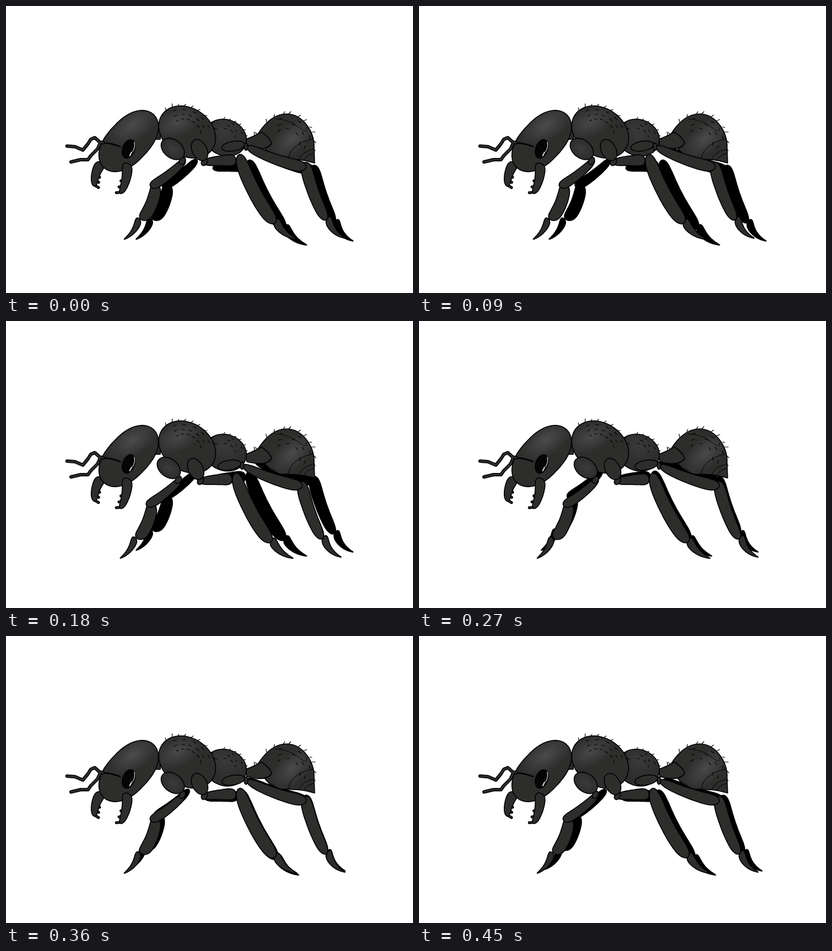
An HTML page for the animation above (0.54 s loop, 720 px wide and 508 px high).

```html
<!DOCTYPE html>
<html lang="en">
<head>
<meta charset="utf-8">
<title>Walking ant</title>
<style>
  html, body { margin: 0; width: 100%; height: 100%; overflow: hidden; background: #fff; }
  svg { display: block; width: 720px; height: 508px; }
  .part { fill: #2d2d2c; stroke: #000; stroke-width: 1.6; stroke-linejoin: round; }
  .far .part { fill: #000; }
  .line { fill: none; stroke: #000; stroke-linecap: round; stroke-linejoin: round; }
</style>
</head>
<body>
<svg viewBox="0 0 720 508">
  <defs></defs>
  <g id="far" class="far"></g>
  <g id="body"></g>
  <g id="near"></g>
</svg>
<script>
const STEP = 90, SHELL = '#2d2d2c';
const defs = document.querySelector('defs');
const far = document.getElementById('far');
const body = document.getElementById('body');
const near = document.getElementById('near');

const make = (tag, parent, attrs) => {
  const el = document.createElementNS('http://www.w3.org/2000/svg', tag);
  for (const k in attrs) el.setAttribute(k, attrs[k]);
  return parent.appendChild(el);
};
const part = (parent, d, fill = '') => {
  make('path', parent, { class: 'part', d }).style.fill = fill;
};
const line = (parent, d, width = 1.2, stroke = '#000') => {
  make('path', parent, { class: 'line', d, 'stroke-width': width }).style.stroke = stroke;
};
const rod = (parent, d, width) => {
  line(parent, d, width);
  line(parent, d, width - 2.8, SHELL);
};
const mix = (a, b, t) => a + (b - a) * t;

let seed = 7;
const random = () => (seed = seed * 16807 % 2147483647) / 2147483647;

// Point on a bowed spine at t, moved sideways by `side`.
function along([x1, y1], [x2, y2], bend, t, side = 0) {
  const len = Math.hypot(x2 - x1, y2 - y1);
  const off = bend * 4 * t * (1 - t) + side;
  return [mix(x1, x2, t) - (y2 - y1) / len * off, mix(y1, y2, t) + (x2 - x1) / len * off];
}

// Tapered, bowed tube with rounded ends; power 2 makes an ellipse.
function tube(a, b, w1, w2, bend = 0, power = 6) {
  const n = 24, left = [], right = [];
  for (let i = 0; i <= n; i++) {
    const t = (1 - Math.cos(Math.PI * i / n)) / 2;
    const w = mix(w1, w2, t) * Math.sqrt(Math.max(0, 1 - Math.abs(2 * t - 1) ** power));
    left.push(along(a, b, bend, t, w));
    right.unshift(along(a, b, bend, t, -w));
  }
  return 'M' + left.concat(right).map(p => p.map(v => v.toFixed(1)).join(' ')).join('L') + 'Z';
}

// Point on a turned ellipse at an angle, both in degrees.
function onOval({ x, y, rx, ry, turn = 0 }, deg, size = 1) {
  const a = deg * Math.PI / 180, r = turn * Math.PI / 180;
  const u = rx * size * Math.cos(a), v = ry * size * Math.sin(a);
  return [x + u * Math.cos(r) - v * Math.sin(r), y + u * Math.sin(r) + v * Math.cos(r)];
}
const oval = o => tube(onOval(o, 180), onOval(o, 0), o.ry, o.ry, 0, 2);

function shade(id, light, { x, y, rx, ry, turn = 0 }) {
  const g = make('radialGradient', defs, {
    id, gradientUnits: 'userSpaceOnUse', cx: 0, cy: 0, r: 1,
    gradientTransform: `translate(${x} ${y}) rotate(${turn}) scale(${rx} ${ry})`
  });
  make('stop', g, { offset: 0, 'stop-color': light });
  make('stop', g, { offset: 1, 'stop-color': SHELL });
  return `url(#${id})`;
}

// Bristles round the rim and short dashes on the shell between two angles.
function fuzz(o, from, to, rim, dashes) {
  let d = '';
  const stroke = (p, q) => { d += `M${p.map(Math.round)}L${q.map(Math.round)}`; };
  for (let i = 0; i < rim; i++) {
    const a = mix(from, to, (i + random() * .7) / rim);
    stroke(onOval(o, a), onOval(o, a + 3, 1.06 + random() * .05));
  }
  for (let i = 0; i < dashes; i++) {
    const a = mix(from, to, (i + random() * .5) / dashes), r = .5 + .18 * (i % 3);
    stroke(onOval(o, a, r), onOval(o, a + 6 / r, r));
  }
  line(body, d);
}

// Joints from hip to toe, with half-widths and bows for each piece.
const legs = {
  front: { hip: [317, 279], knee: [256, 327], shin: [266, 322], ankle: [241, 386], foot: [235, 383], toe: [209, 420],
           wide: [6, 9, 10, 11, 7], bows: [-3, -5, -5], shift: [7, -7] },
  mid:   { hip: [349, 284], knee: [407, 280], shin: [412, 270], ankle: [475, 392], foot: [477, 386], toe: [515, 420],
           wide: [6, 11, 11, 12, 9], bows: [-1, 6, 6], shift: [3, 3] },
  hind:  { hip: [426, 256], knee: [531, 293], shin: [529, 284], ankle: [566, 386], foot: [570, 381], toe: [600, 418],
           wide: [7, 11, 11, 9, 8], bows: [4, 4, 7], shift: [0, -2] }
};
function addLeg(parent, { hip, knee, shin, ankle, foot, toe, wide, bows }, [x, y] = [0, 0]) {
  const g = make('g', parent, { transform: `translate(${x} ${y})` });
  part(g, tube(foot, toe, wide[4], 1, bows[2]));
  part(g, tube(shin, ankle, wide[2], wide[3], bows[1]));
  part(g, tube(hip, knee, wide[0], wide[1], bows[0]));
}
for (const leg of Object.values(legs)) {
  addLeg(far, leg, leg.shift);
  addLeg(near, leg);
}

const coxa = { x: 295, y: 260, rx: 23, ry: 16, turn: 38 };
part(near, oval({ x: 312, y: 281, rx: 7, ry: 5, turn: -60 }));
part(near, oval({ x: 351, y: 283, rx: 7, ry: 5, turn: -60 }));
part(near, oval({ x: 424.5, y: 256, rx: 3.2, ry: 6.5 }));
part(near, oval(coxa), shade('coxa', '#3b3b3b', coxa));
part(near, oval({ x: 342.5, y: 262, rx: 20, ry: 13, turn: 63 }));
part(near, oval({ x: 402, y: 255, rx: 20.5, ry: 8.5, turn: -10 }));

// Tail and petiole
const tail = { x: 496, y: 242, rx: 49, ry: 51 };
part(body, 'M446 226C462 201 480 191 496 191C526 191 546 224 545 250L546 278C522 270 504 272 485 271C466 266 452 250 446 226Z',
  shade('tail', '#4a4a4a', { x: 507, y: 234, rx: 48, ry: 26, turn: -42 }));
line(body, 'M470 261Q478 268 485 271M499 271Q502 255 516 246T543 236M518 272Q522 259 544 253M527 273Q531 264 544 261', 1);
line(body, 'M476 200Q499 200 517 214T531 215', .8);
fuzz(tail, -135, 20, 10, 11);
part(body, 'M424 236Q440 230 452 223Q468 234 470 243C464 254 446 254 426 249Z');
line(body, 'M440 230L439 223M445 227L441 224');

// Waist, neck, chest
const waist = { x: 388, y: 233, rx: 38, ry: 32, turn: 20 };
part(body, oval(waist), shade('waist', '#393939', { ...waist, y: 222 }));
fuzz(waist, -115, -25, 6, 7);
part(body, 'M263 211H273V236H263Z');
const chest = { x: 320.5, y: 223, rx: 54, ry: 42, turn: 35 };
part(body, oval(chest), shade('chest', '#484848', { x: 304, y: 205, rx: 46, ry: 26, turn: -25 }));
fuzz(chest, -170, -45, 9, 16);

// Head, eye, jaws, feelers
function jaw(root, tip, bend) {
  for (const t of [.55, .75, .95]) {
    rod(body, `M${along(root, tip, bend, t)}L${along(root, tip, bend, t + .05, -bend * 2)}`, 5);
  }
  part(body, tube(root, tip, 10, 5, bend));
}
jaw([170, 276], [156, 319], 4);
part(body, tube([173, 286], [261, 192], 37, 37, 0, 2.4),
  shade('head', '#4b4b4b', { x: 224, y: 211, rx: 52, ry: 28, turn: -32 }));
jaw([214, 278], [203, 332], -4);
part(body, oval({ x: 217, y: 253, rx: 17, ry: 10.5, turn: 110 }), '#050505');
line(body, 'M227 241Q229 250 224 258', 1.2, '#ddd');
line(body, 'M222 259L219 265', 2, '#ddd');
line(body, 'M202 249Q185 242 168 242', 2.4);
rod(body, 'M166 244L162 253L150 265L145 272L132 272L115 276M172 242L166 241L157 233L150 236L145 244L136 255L122 249L108 248', 6);

// Hold one [x, y] per step, with hard changes.
function hold(el, xs, ys) {
  const n = xs.length;
  const frames = [...xs, xs[n - 1]].map((x, i) => ({
    offset: i / n, easing: 'step-end',
    transform: `translate(${x * 7}px, ${ys[Math.min(i, n - 1)] * 7}px)`
  }));
  el.animate(frames, { duration: n * STEP, iterations: Infinity });
}
hold(near, [0, -1, -1, 0, 0, 0], [-1, -1, 0, 0, 0, 0]);
hold(far, [2, 2, 2, 0, 0, 1], [0, 0, -1, -1, 0, 0]);
</script>
</body>
</html>
```
